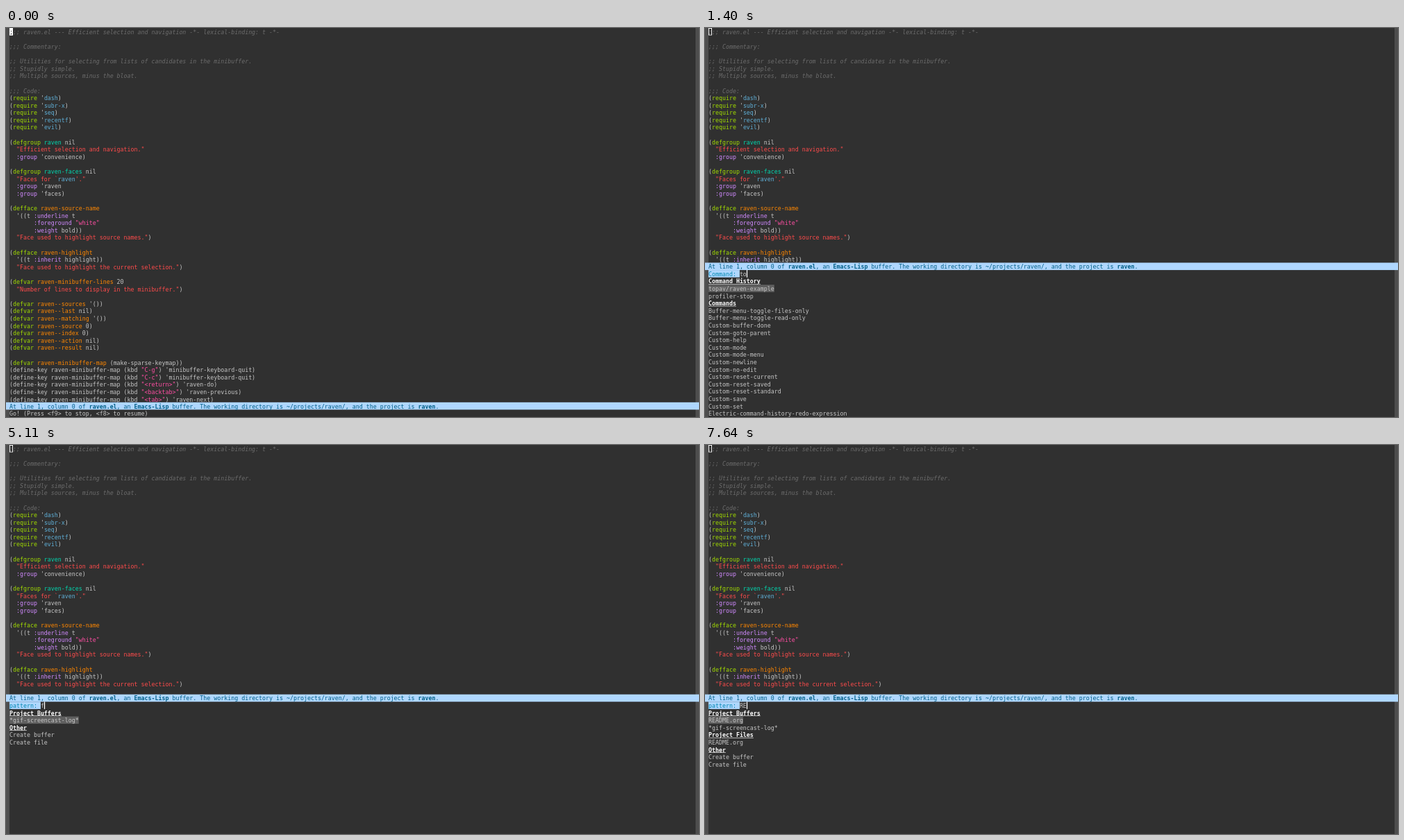
Write an HTML page that moves like this. It is 998 by 561 pixels and loops after 8000 ms.

```html
<!DOCTYPE html>
<html lang="en">
<head>
<meta charset="utf-8">
<title>Editor completion</title>
<style>
html, body { margin: 0; width: 100%; height: 100%; overflow: hidden; background: #303030; }
/* Laid out on an 8 x 17 character grid, then scaled to the stage. */
#screen {
  position: absolute; left: 0; top: 0; width: 1600px; height: 900px; overflow: hidden;
  transform: scale(calc(998 / 1600), calc(561 / 900)); transform-origin: 0 0;
  background: #303030; color: #c6c6c6;
  font: 13.29px/17px "DejaVu Sans Mono", monospace; white-space: pre;
}
#screen::before, #screen::after { content: ""; position: absolute; top: 0; width: 8px; height: 900px; background: #4e4e4e; }
#screen::before { left: 0; }
#screen::after { right: 0; }
/* Text sits 1px low in its cell; cell backgrounds reach 1px up to compensate. */
#code, #mini { position: absolute; left: 8px; }
#code { top: 1px; }
#mini { top: 18px; }
#lower { position: absolute; z-index: 1; left: 0; width: 1600px; height: 900px; }
#lower::before { content: ""; position: absolute; left: 8px; right: 8px; top: 0; height: 900px; background: #303030; }
#mode { position: absolute; left: 0; width: 1592px; height: 17px; line-height: 19px; padding-left: 8px; background: #afd7ff; color: #005f87; }
.com { color: #6c6c6c; font-style: italic; }
.key { color: #a1db00; }
.type { color: #00d7af; }
.var { color: #ff8700; }
.doc { color: #ff4b4b; }
.str { color: #ff4ea3; }
.attr { color: #d18aff; }
.con { color: #5fafd7; }
.head { color: #fff; font-weight: bold; text-decoration: underline; }
.prompt, .pick { display: inline-block; height: 16px; margin-top: -1px; padding-top: 1px; vertical-align: top; }
.prompt { background: #afd7ff; color: #0087af; }
.pick { background: #5f5f5f; }
.bar, .box { position: absolute; top: -1px; height: 17px; }
.bar { width: 2px; background: #fff; }
.box { left: 0; width: 8px; line-height: 19px; box-shadow: inset 0 0 0 1.5px #fff; }
.box.solid { background: #fff; color: #303030; }
</style>
</head>
<body>
<div id="screen">
<div id="code"></div>
<div id="lower"><div id="mode">At line 1, column 0 of <b>raven.el</b>, an <b>Emacs-Lisp</b> buffer. The working directory is ~/projects/raven/, and the project is <b>raven</b>.</div><div id="mini"></div></div>
</div>
<script type="text/plain" id="lisp">;;; raven.el --- Efficient selection and navigation -*- lexical-binding: t -*-

;;; Commentary:

;; Utilities for selecting from lists of candidates in the minibuffer.
;; Stupidly simple.
;; Multiple sources, minus the bloat.

;;; Code:
(require 'dash)
(require 'subr-x)
(require 'seq)
(require 'recentf)
(require 'evil)

(defgroup raven nil
  "Efficient selection and navigation."
  :group 'convenience)

(defgroup raven-faces nil
  "Faces for `raven'."
  :group 'raven
  :group 'faces)

(defface raven-source-name
  '((t :underline t
       :foreground "white"
       :weight bold))
  "Face used to highlight source names.")

(defface raven-highlight
  '((t :inherit highlight))
  "Face used to highlight the current selection.")

(defvar raven-minibuffer-lines 20
  "Number of lines to display in the minibuffer.")

(defvar raven--sources '())
(defvar raven--last nil)
(defvar raven--matching '())
(defvar raven--source 0)
(defvar raven--index 0)
(defvar raven--action nil)
(defvar raven--result nil)

(defvar raven-minibuffer-map (make-sparse-keymap))
(define-key raven-minibuffer-map (kbd "C-g") 'minibuffer-keyboard-quit)
(define-key raven-minibuffer-map (kbd "C-c") 'minibuffer-keyboard-quit)
(define-key raven-minibuffer-map (kbd "<return>") 'raven-do)
(define-key raven-minibuffer-map (kbd "<backtab>") 'raven-previous)
(define-key raven-minibuffer-map (kbd "<tab>") 'raven-next)</script>
<script>
const LOOP = 8000, ROW = 17, CELL = 8;
const $ = id => document.getElementById(id);
const esc = s => s.replace(/</g, "&lt;").replace(/>/g, "&gt;");
const span = (cls, s) => `<span class="${cls}">${s}</span>`;

function paintLine(raw) {
  const line = esc(raw);
  if (line.startsWith(";;")) return span("com", line);
  if (line.startsWith('  "')) {
    return line.replace(/".*"/, s => span("doc", s.replace(/`(\w+)'/, (_, w) => "`" + span("con", w) + "'")));
  }
  const rule = /^\((require|defgroup|defface|defvar) ('?)([\w-]+)|"[^"]*"|:[a-z]+/g;
  return line.replace(rule, (all, form, quote, name) => {
    if (!form) return span(all[0] === ":" ? "attr" : "str", all);
    const cls = { require: "con", defgroup: "type" }[form] || "var";
    return "(" + span("key", form) + " " + quote + span(cls, name);
  });
}

// Groups are [heading, items]; the very first item is selected.
function picker(prompt, typed, groups, cursor = true) {
  const rows = [span("prompt", prompt) + esc(typed)];
  let first = true;
  for (const [title, items] of groups) {
    rows.push(span("head", title));
    for (const item of items) {
      rows.push(first ? span("pick", esc(item)) : esc(item));
      first = false;
    }
  }
  const left = CELL * (prompt.length + typed.length);
  return rows.join("\n") + (cursor ? `<i class="bar" style="left:${left}px"></i>` : "");
}

const words = s => s.trim().split(/\s+/);
const prefixed = (pre, s) => words(s).map(w => pre + w);

const example = "topav/raven-example";
const command = (typed, list, cursor, history = [example, "profiler-stop"]) =>
  picker("Command: ", typed, [["Command History", history], ["Commands", list]], cursor);

const every = [
  ...prefixed("2C-", "associate-buffer command split two-columns"), "5x5", "5x5-crack",
  ...prefixed("5x5-crack-", "mutating-best mutating-current randomly xor-mutate"),
  ...prefixed("Buffer-menu-", "1-window 2-window backup-unmark bury delete")
];
const withT = [
  ...prefixed("2C-", "associate-buffer split two-columns"),
  ...prefixed("5x5-crack-", "mutating-best mutating-current xor-mutate"),
  ...prefixed("Buffer-menu-", "delete delete-backwards execute multi-occur not-modified other-window select sort switch-other-window")
];
const withTo = [
  ...prefixed("Buffer-menu-toggle-", "files-only read-only"),
  ...prefixed("Custom-", `buffer-done goto-parent help mode mode-menu newline no-edit
    reset-current reset-saved reset-standard save set`),
  "Electric-command-history-redo-expression"
];
const own = prefixed("topav/", `agda-load alsa-mute alsa-unmute-headphone alsa-unmute-speaker
  browse-url browser-quinine/body browser-quinine/lambda-<escape>-and-exit
  browser-quinine/topav/browse-url-and-exit browser-quinine/topav/search-web-and-exit
  browser-quinine/topav/visit-bookmark-and-exit coq-man dehighlight-channel
  dired-find-file dired-thumbnails eshell-clear feed-quinine/body`);
const withTop = [
  "Info-top-node",
  ...prefixed("desktop-", "change-dir clear read remove revert save save-in-desktop-dir save-mode"),
  "gif-screencast-stop", "profiler-stop", ...own.slice(0, 4)
];

const log = "*gif-screencast-log*", readme = "README.org";
const other = ["Other", ["Create buffer", "Create file"]];
const pattern = (typed, groups, cursor) => picker("pattern: ", typed, [...groups, other], cursor);
const onlyLog = pattern("f", [["Project Buffers", [log]]]);

const hints = ": eval,? help,a agenda,b browser,c chat,d feed,e mail,f file,i lang,m music,o buf,p proj,r research,s sh,v vc"
  .split(",").map(h => `[${span("con", h[0])}]: ${h.slice(2)}`).join(", ");

// [start in ms, rows below the mode line, contents]
const states = [
  [0, 1, esc("Go! (Press <f9> to stop, <f8> to resume)")],
  [640, 2, `Quinine: ${hints}.<i class="box"></i>`],
  [1130, 20, command("", every)],
  [1220, 20, command("t", withT)],
  [1400, 20, command("to", withTo)],
  [1560, 20, command("top", withTop)],
  [2330, 20, command("topav", own, false, [example])],
  [5110, 18, onlyLog],
  [5170, 18, pattern("fo", [])],
  [5310, 18, pattern("fo", [], false)],
  [5850, 18, pattern("fo", [])],
  [5990, 18, onlyLog],
  [7490, 18, pattern("R", [
    ["Project Buffers", [readme, "raven.el", log]],
    ["Project Files", [".gitignore", readme, "raven.el", ...prefixed("raven-", "buffers.el sources.el test.el")]]
  ])],
  [7640, 18, pattern("RE", [["Project Buffers", [readme, log]], ["Project Files", [readme]]])]
];

$("code").innerHTML = $("lisp").textContent.split("\n").map(paintLine).join("\n") + '<span class="box" id="point"></span>';

let shown = -1;
function tick() {
  const t = performance.now() % LOOP;
  const now = states.filter(s => s[0] <= t).length - 1;
  if (now !== shown) {
    shown = now;
    const [start, rows, html] = states[now];
    const solid = start < 1130;
    $("lower").style.top = 900 - (rows + 1) * ROW + "px";
    $("mini").innerHTML = html;
    $("point").className = solid ? "box solid" : "box";
    $("point").textContent = solid ? ";" : "";
  }
  requestAnimationFrame(tick);
}
tick();
</script>
</body>
</html>
```
